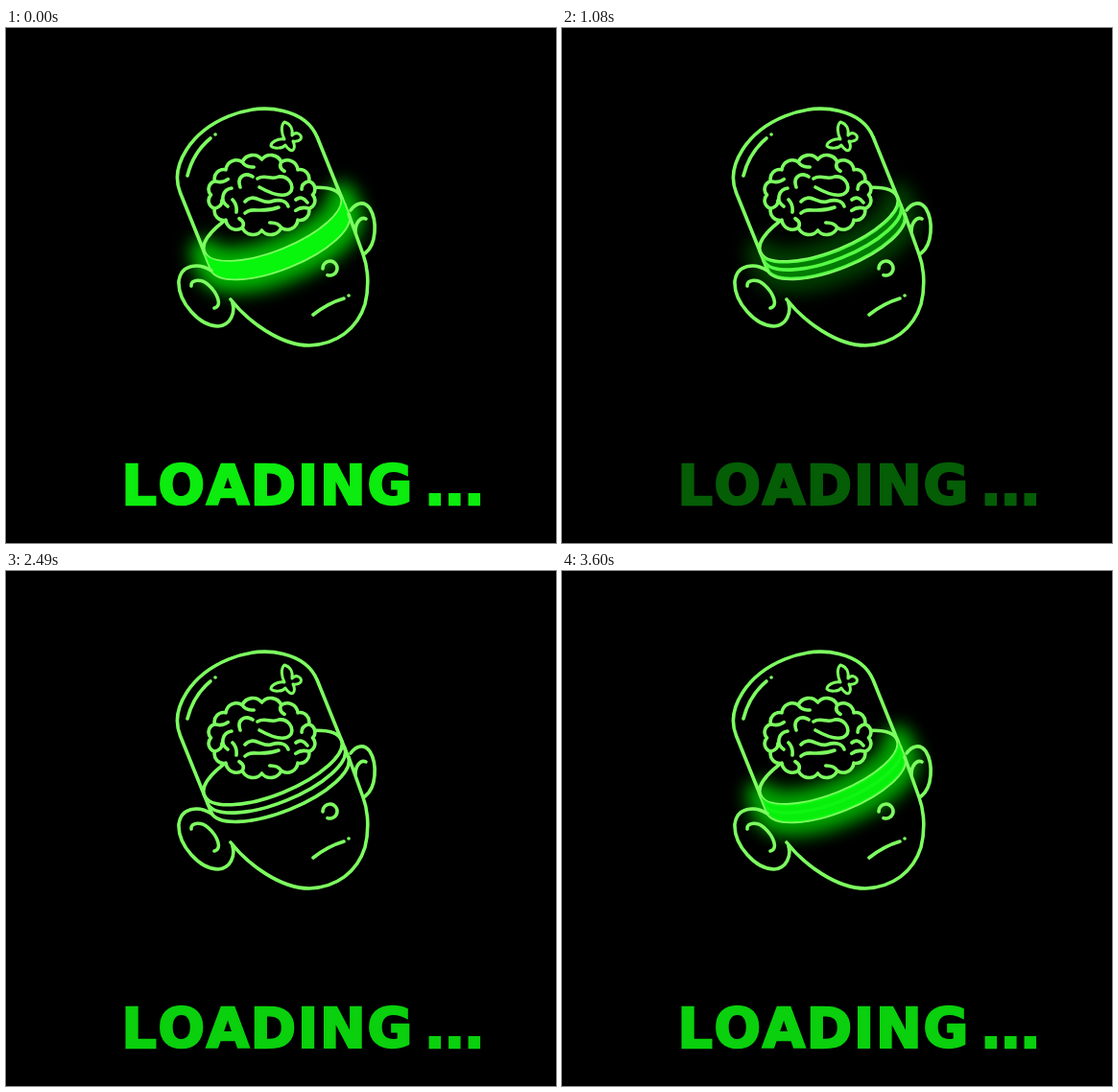
An HTML page for the animation above (3.63 s loop, 573x537 px).

```html
<!DOCTYPE html>
<html lang="en">
<head>
<meta charset="utf-8">
<title>Loading</title>
<style>
  html, body { margin: 0; width: 100%; height: 100%; overflow: hidden; background: #000; }
  svg { display: block; }
  .line { fill: none; stroke: #7dff60; stroke-width: 3.6; stroke-linecap: round; stroke-linejoin: round; }
  text { font: bold 57px "DejaVu Sans", sans-serif; font-kerning: none; stroke-width: 2.5; }
</style>
</head>
<body>
<svg width="573" height="537" viewBox="0 0 573 537">
  <defs>
    <filter id="blur" x="-50%" y="-150%" width="200%" height="400%">
      <feGaussianBlur stdDeviation="9"/>
    </filter>
    <path id="band" d="M-77 0A77 28 0 0 0 77 0V19A77 28 0 0 1-77 19Z"/>
  </defs>

  <!-- dome, its rim and the glowing band share one tilted frame -->
  <g class="line" transform="translate(278 205) rotate(-22)">
    <use id="halo" href="#band" fill="#00b406" stroke="#00b406" stroke-width="30" filter="url(#blur)"/>
    <path d="M-77 19V-67A77 55 0 0 1 77-67V19"/>
    <ellipse rx="77" ry="28"/>
    <path d="M-77 9A77 28 0 0 0 77 9M-77 19A77 28 0 0 0 77 19"/>
    <use id="fill" href="#band" fill="#08f50c" stroke="none"/>
  </g>

  <g class="line">
    <!-- dome highlight -->
    <path d="M189 154C193 138 202 124 213 115M218 111h.1"/>
    <!-- face -->
    <path d="M357 194L372 236C378 252 378 272 374 288C366 314 344 330 316 331C286 331 252 306 234 283"/>
    <path d="M330 251A7.5 7.5 0 1 1 335 257.6M320 299Q335 287 352 282M357 279h.1"/>
    <!-- ears -->
    <path d="M214 253C200 244 182 247 180 264C179 286 202 311 221 311C234 310 239 297 236 287"/>
    <path d="M193 269C192 262 204 261 211 268C220 276 226 290 217 292"/>
    <path d="M359 190C365 182 373 180 379 188C387 201 386 226 374 235M364 212C364 204 369 196 375 199"/>
    <!-- butterfly -->
    <path stroke-width="3" d="M290 98C297 100 299 106 298 112C302 107 309 111 307 116Q304 119 299 118C303 126 298 133 291 122C288 126 279 126 276 123C276 119 283 115 290 116C287 110 286 102 290 98Z"/>
    <!-- brain -->
    <path id="brain" style="fill:#000"/>
    <path d="M244 166C240 155 249 150 257 155M262 157C270 152 276 159 284 155C294 154 300 163 297 170C292 177 282 176 264 166
      M249 181C258 171 267 184 276 181S292 180 294 186M249 193C257 186 264 194 284 187
      M235 167C226 168 222 180 231 186M236 179Q241 184 240 192M302 179Q308 174 314 182"/>
  </g>

  <g id="label">
    <text x="120.5" y="497" letter-spacing="1.8">LOADING</text>
    <text x="436" y="497" letter-spacing="-1.2">...</text>
  </g>
</svg>
<script>
  const LOOP = 3630;
  const $ = id => document.getElementById(id);

  // Brain: round lobes along an ellipse, every other seam curling inwards
  function brainPath(lobes) {
    const at = (i, scale = 1) => {
      const a = i / lobes * 2 * Math.PI;
      return [266.5 + 53 * scale * Math.cos(a), 174 + 37 * scale * Math.sin(a)];
    };
    let rim = `M${at(0)}`, seams = '';
    for (let i = 1; i <= lobes; i++) {
      const [x, y] = at(i), [px, py] = at(i - 1);
      const r = Math.hypot(x - px, y - py) * 0.58;
      rim += `A${r} ${r} 0 0 1 ${x} ${y}`;
      if (i % 2) seams += `M${x} ${y}Q${at(i, .84)} ${at(i + .5, .8)}`;
    }
    return rim + 'Z' + seams;
  }
  $('brain').setAttribute('d', brainPath(16));

  const wave = (t, period, peak = 0) => Math.cos((t - peak) / period * 2 * Math.PI);

  function draw(t) {
    // the glow dips deeper with every beat, the label swings less and brightens
    const dip = (.55 + t / 5000) * (1 - wave(t, 1735)) / 2;
    const green = 158 + t * .012 + (90 - t * .01) * wave(t, 1940, 165);

    $('halo').style.opacity = $('fill').style.opacity = Math.max(0, 1 - dip);
    $('label').style.fill = $('label').style.stroke = `rgb(${green * .05},${green},${green * .06})`;
  }

  const start = performance.now();
  function tick() {
    draw((performance.now() - start) % LOOP);
    requestAnimationFrame(tick);
  }
  tick();
</script>
</body>
</html>
```
